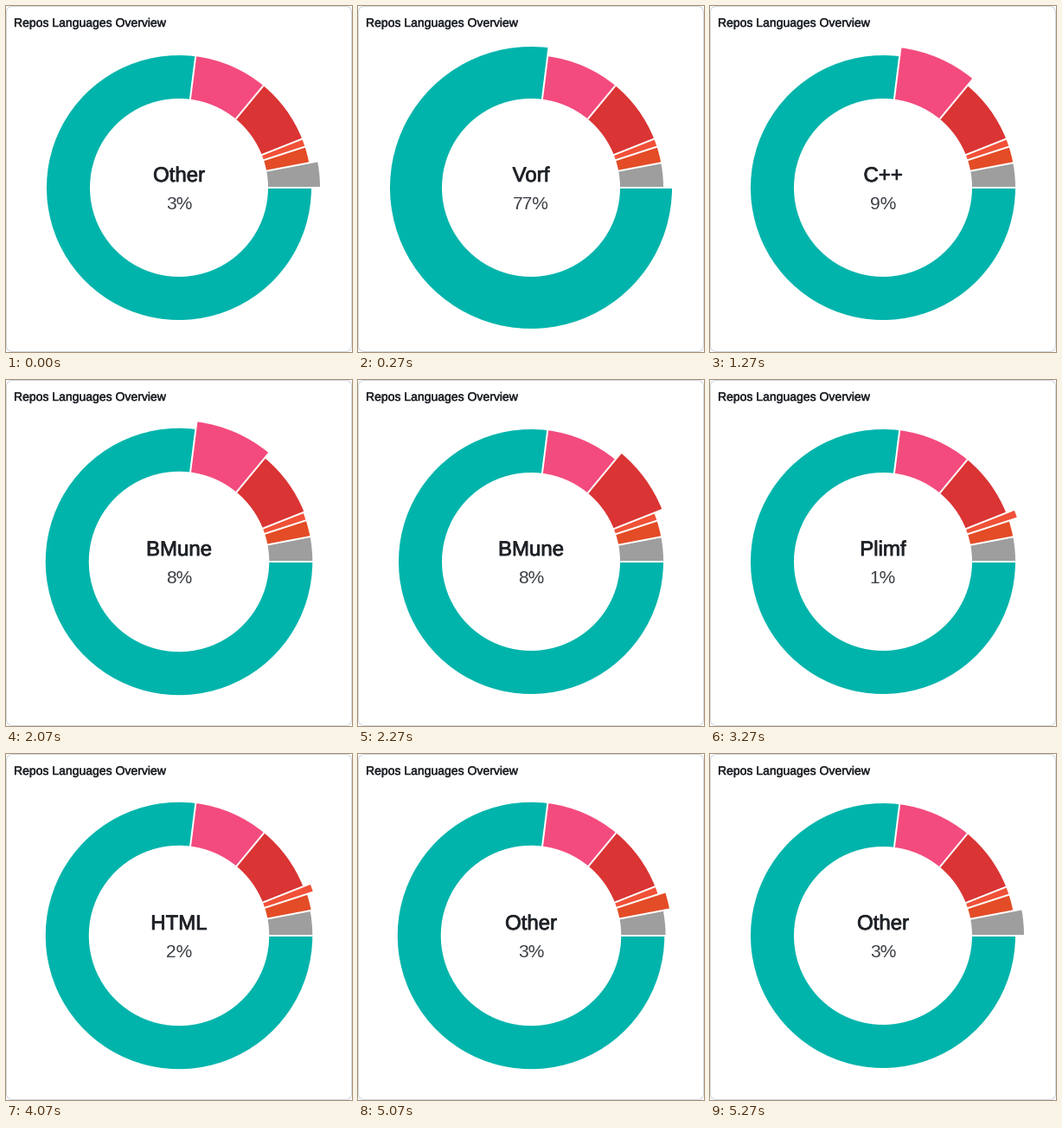
A matplotlib script that plays this animation: 400 px wide and 400 px high, repeating every 5990 ms.

```python
import math

import matplotlib.pyplot as plt
from matplotlib.animation import FuncAnimation
from matplotlib.patches import FancyBboxPatch, Wedge
from matplotlib.patheffects import withStroke

SIZE, DPI = 400, 100
LOOP_MS, STEP_MS = 5990, 10
RATE = 15                     # picture updates per second, also ticks per slice
CX, CY = 200, 210
REACH = 163                   # outer radius of the highlighted slice
THICK, EXTRA = 50, 10
INK = "#1f2328"

SLICES = [
    ("Vorf", 77, "#00b4ab"),
    ("C++", 9, "#f34b7d"),
    ("BMune", 8, "#da3434"),
    ("Plimf", 1, "#f05138"),
    ("HTML", 2, "#e34c26"),
    ("Other", 3, "#9e9e9e"),
]


def pt(px):
    return px * 72 / DPI


fig = plt.figure(figsize=(SIZE / DPI, SIZE / DPI), dpi=DPI, facecolor="white")
ax = fig.add_axes([0, 0, 1, 1])
ax.set_xlim(0, SIZE)
ax.set_ylim(SIZE, 0)
ax.axis("off")


def label(x, y, text, px, color, bold=0, ha="center"):
    item = ax.text(x, y, text, family="Liberation Sans", fontsize=pt(px),
                   color=color, ha=ha, va="baseline")
    if bold:
        item.set_path_effects([withStroke(linewidth=pt(bold), foreground=color)])
    return item


ax.add_patch(FancyBboxPatch((0.5, 0.5), SIZE - 1, SIZE - 1,
                            boxstyle="round,pad=0,rounding_size=7",
                            facecolor="white", edgecolor="#d0d7de",
                            linewidth=pt(1)))
label(9, 24, "Repos Languages Overview", 14, INK, 0.45, "left")
name = label(CX, 203, "", 24, INK, 0.8)
share = label(CX, 235, "", 21, "#3c4046")

wedges = []
start = 0
for _, percent, color in SLICES:
    end = start + percent * 3.6
    wedge = Wedge((CX, CY), REACH, start, end, width=THICK,
                  facecolor=color, linewidth=0)
    wedges.append(ax.add_patch(wedge))
    a = math.radians(start)
    ax.plot([CX + r * math.cos(a) for r in (95, 168)],
            [CY + r * math.sin(a) for r in (95, 168)],
            color="white", linewidth=pt(2), solid_capstyle="butt", zorder=2)
    start = end


def update(frame):
    tick = (frame * STEP_MS + 5) * RATE // 1000
    turn, step = divmod(tick - 1, RATE)
    active = turn % len(SLICES)
    previous = (active - 1) % len(SLICES)
    t = min(1, 0.125 + step / 3)

    widths = [THICK] * len(SLICES)
    widths[previous] += EXTRA * (1 - t)
    widths[active] += EXTRA * t
    # The thickest slice always touches the outer limit, so the hole breathes.
    hole = REACH - max(widths)
    for wedge, width in zip(wedges, widths):
        wedge.set_radius(hole + width)
        wedge.set_width(width)

    title, percent, _ = SLICES[active]
    name.set_text(title)
    share.set_text(f"{percent}%")
    return [*wedges, name, share]


anim = FuncAnimation(fig, update, frames=LOOP_MS // STEP_MS, interval=STEP_MS,
                     init_func=lambda: update(0), repeat=True, repeat_delay=0,
                     blit=False, cache_frame_data=False)
plt.show()
```
